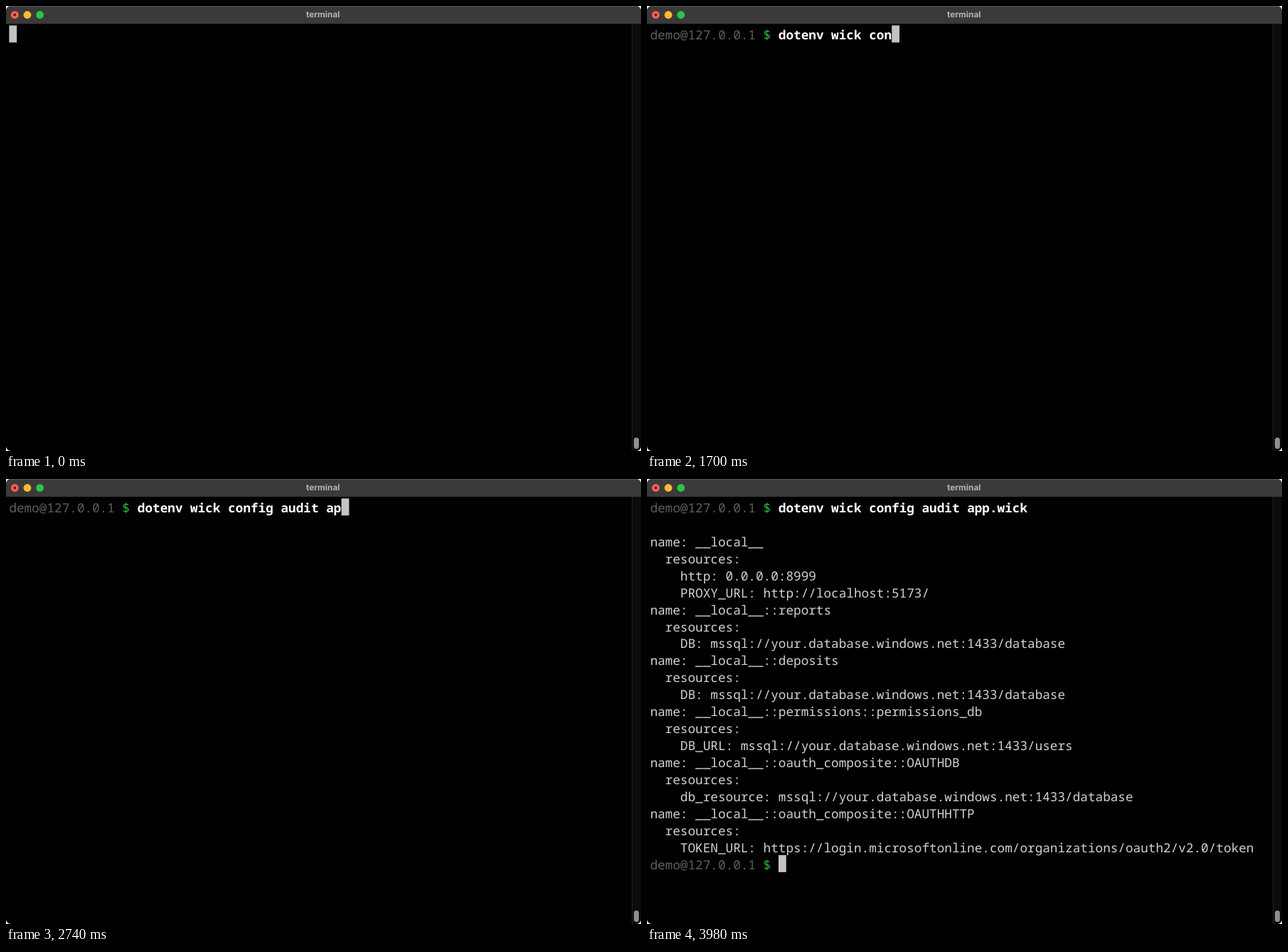
Animation, 893 px wide and 627 px high, one loop 5.75 s. Source, as an HTML page:

```html
<!DOCTYPE html>
<html lang="en">
<head>
<meta charset="utf-8">
<title>terminal</title>
<style>
  html, body { margin: 0; width: 100%; height: 100%; overflow: hidden; background: #fff; }
  svg { display: block; }
  text { white-space: pre; text-rendering: geometricPrecision; }
  .mono { font: 500 17.7px "Noto Sans Mono", monospace; fill: #d2d2d2; }
  .mono .host { font-weight: 400; fill: #5e5e5e; }
  .mono .sign { font-weight: 500; fill: #1fc436; }
  .mono .cmd { font-weight: 700; fill: #fff; }
  .title { font: 700 11.8px Inter, sans-serif; fill: #b5b5b5; text-anchor: middle; }
</style>
</head>
<body>
<svg width="893" height="627" viewBox="0 0 893 627">
  <clipPath id="win"><rect width="893" height="627" rx="7"/></clipPath>
  <g clip-path="url(#win)">
    <rect width="893" height="627" fill="#000"/>
    <rect width="893" height="25" fill="#3a3a3a"/>
    <rect width="893" height="1" fill="#575757"/>
    <rect x="880" y="25" width="13" height="602" fill="#0b0b0b"/>
    <rect x="880" y="25" width="1" height="602" fill="#242424"/>
    <rect x="883" y="608" width="7" height="16" rx="3.5" fill="#8f8f8f"/>
    <circle cx="12.3" cy="12.5" r="5.4" fill="#ff5f57"/>
    <circle cx="12.3" cy="12.5" r="1.9" fill="#7a0d08"/>
    <circle cx="30" cy="12.5" r="5.4" fill="#fdb932"/>
    <circle cx="47.7" cy="12.5" r="5.4" fill="#28c740"/>
    <text class="title" x="445.7" y="16.2">terminal</text>
    <g id="screen" class="mono"></g>
    <rect id="cursor" width="10.8" height="24" fill="#c3c3c3"/>
  </g>
</svg>
<script>
const LOOP = 5750;
const LEFT = 4.4, TOP = 27.4, COL = 10.62, ROW = 23.93;
const PROMPT_COLS = 17, LAST_ROW = 21;
const COMMAND = "dotenv wick config audit app.wick";
const PROMPT_AT = 100, ENTER_AT = 3790, OUTPUT_AT = 3880, DONE_AT = 3980;

// Typing bursts: start time, then characters visible after each tick.
const BURSTS = [
  [670, 1, 2, 4, 5, 6, 8, 9],
  [1320, 10, 11, 12, 14, 15, 16],
  [1980, 17, 18, 19, 20, 22, 23, 24],
  [2640, 26, 27, 28, 29, 30, 31, 33]
];
const TICK = 94;

const OUTPUT = `name: __local__
  resources:
    http: 0.0.0.0:8999
    PROXY_URL: http://localhost:5173/
name: __local__::reports
  resources:
    DB: mssql://your.database.windows.net:1433/database
name: __local__::deposits
  resources:
    DB: mssql://your.database.windows.net:1433/database
name: __local__::permissions::permissions_db
  resources:
    DB_URL: mssql://your.database.windows.net:1433/users
name: __local__::oauth_composite::OAUTHDB
  resources:
    db_resource: mssql://your.database.windows.net:1433/database
name: __local__::oauth_composite::OAUTHHTTP
  resources:
    TOKEN_URL: https://login.microsoftonline.com/organizations/oauth2/v2.0/token`.split("\n");

const NS = "http://www.w3.org/2000/svg";
const screen = document.getElementById("screen");
const cursor = document.getElementById("cursor");

function add(parent, tag, attrs, content = "") {
  const el = document.createElementNS(NS, tag);
  for (const key in attrs) el.setAttribute(key, attrs[key]);
  el.textContent = content;
  return parent.appendChild(el);
}

function addLine(parent, row, content) {
  return add(parent, "text", { x: LEFT, y: TOP + row * ROW + 19.6 }, content);
}

function addPrompt(row) {
  const line = addLine(screen, row);
  add(line, "tspan", { class: "host" }, "demo@127.0.0.1 ");
  add(line, "tspan", { class: "sign" }, "$ ");
  return line;
}

const firstPrompt = addPrompt(0);
const typed = add(firstPrompt, "tspan", { class: "cmd" });
const output = add(screen, "g", {});
OUTPUT.forEach((content, i) => addLine(output, i + 2, content));
const lastPrompt = addPrompt(LAST_ROW);

function typedCount(t) {
  let count = 0;
  for (const [start, ...counts] of BURSTS) {
    if (t < start) break;
    const step = Math.floor((t - start + 4) / TICK);
    count = counts[Math.min(step, counts.length - 1)];
  }
  return count;
}

function show(el, on) {
  el.setAttribute("visibility", on ? "visible" : "hidden");
}

function cursorCell(t, count) {
  if (t < PROMPT_AT) return [0, 0];
  if (t < ENTER_AT) return [PROMPT_COLS + count, 0];
  if (t < OUTPUT_AT) return [0, 1];
  return [t < DONE_AT ? 0 : PROMPT_COLS, LAST_ROW];
}

function draw(t) {
  const count = typedCount(t);
  typed.textContent = COMMAND.slice(0, count);
  show(firstPrompt, t >= PROMPT_AT);
  show(output, t >= OUTPUT_AT);
  show(lastPrompt, t >= DONE_AT);
  const [col, row] = cursorCell(t, count);
  cursor.setAttribute("x", LEFT + col * COL);
  cursor.setAttribute("y", TOP + row * ROW);
}

const begin = performance.now();
function loop() {
  draw((performance.now() - begin) % LOOP);
  requestAnimationFrame(loop);
}
loop();
</script>
</body>
</html>
```
